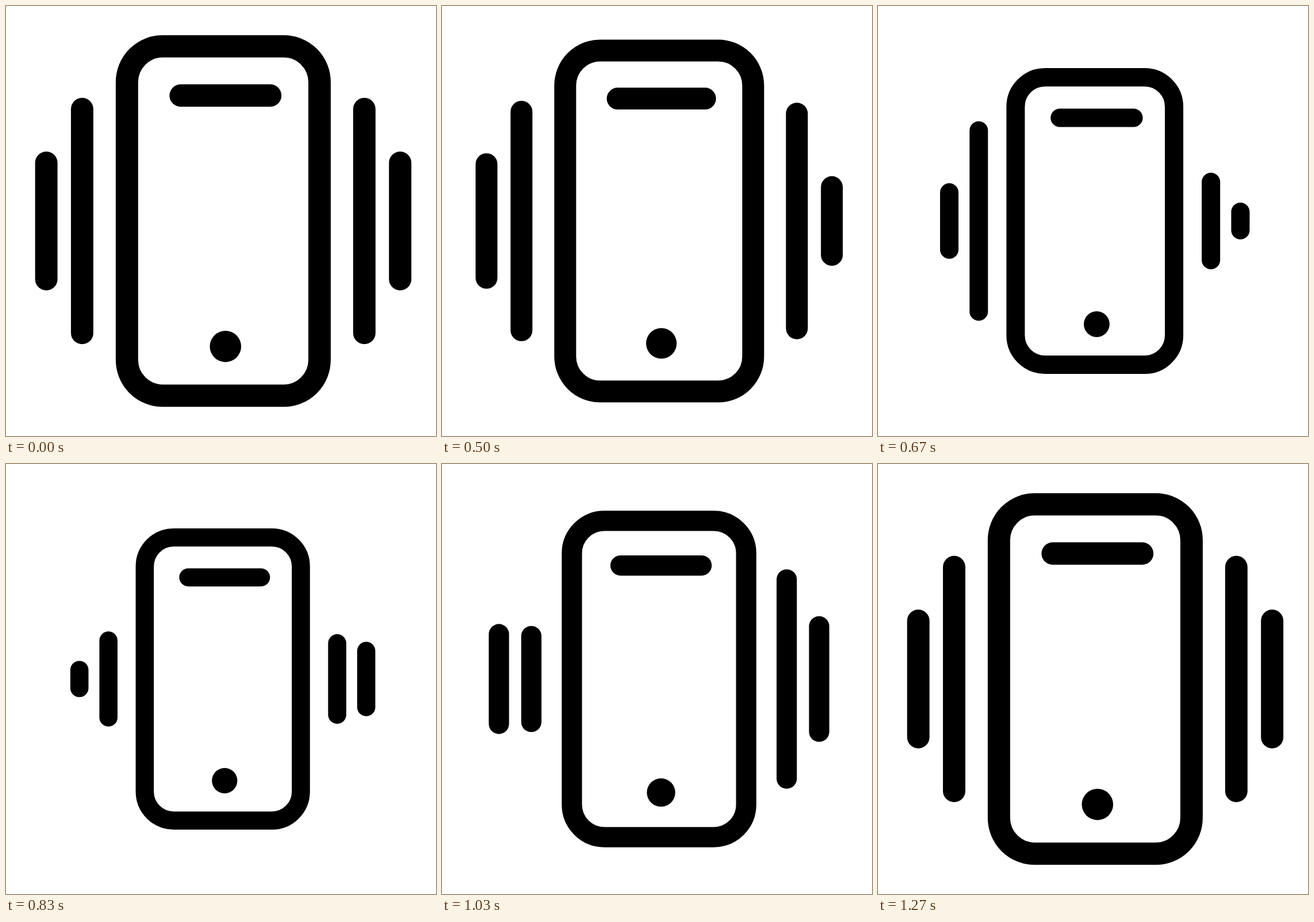
An HTML page that plays this animation: 748x748 px, repeating every 1370 ms.

```html
<!DOCTYPE html>
<html lang="en">
<head>
<meta charset="utf-8">
<title>Vibrating phone</title>
<style>
  html, body { margin: 0; width: 100%; height: 100%; overflow: hidden; background: #fff; }
  svg { display: block; width: 100vw; height: 100vh; }
  .line { fill: none; stroke: #000; stroke-width: 5; stroke-linecap: round; }
</style>
</head>
<body>
<svg viewBox="0 0 96 96">
  <g id="icon">
    <rect class="line" x="27" y="9" width="43" height="78" rx="8"/>
    <path class="line" d="M39 20H59"/>
    <circle cx="49" cy="76" r="3.5"/>
  </g>
</svg>
<script>
const LOOP = 1370;
const MID = 48;
const icon = document.getElementById('icon');

// Each bar shrinks for `span` ticks from `start`, then grows back as long.
const bars = [
  { x: 9,  full: 26, min: 5,    start: 15, span: 10 },
  { x: 17, full: 50, min: 18.8, start: 18, span: 10 },
  { x: 80, full: 50, min: 18.8, start: 13, span: 10 },
  { x: 88, full: 26, min: 5,    start: 10, span: 10 },
];
const zoom = { full: 1, min: 0.81, start: 10, span: 14 };

for (const bar of bars) {
  bar.path = document.createElementNS('http://www.w3.org/2000/svg', 'path');
  bar.path.setAttribute('class', 'line');
  icon.append(bar.path);
}

// cubic-bezier(.8, 0, .2, 1), solved by bisection
function ease(u) {
  if (u <= 0) return 0;
  if (u >= 1) return 1;
  let lo = 0, hi = 1;
  for (let i = 0; i < 30; i++) {
    const v = (lo + hi) / 2, w = 1 - v;
    const x = 2.4 * w * w * v + 0.6 * w * v * v + v * v * v;
    if (x < u) lo = v; else hi = v;
  }
  return lo * lo * (3 - 2 * lo);
}

function valueAt({ full, min, start, span }, tick) {
  const away = Math.abs(tick - start - span) / span;
  return full - (full - min) * ease(1 - away);
}

function draw(ms) {
  // 30 ticks per second, each starting on a whole 10 ms
  const tick = Math.floor((Math.floor((ms % LOOP) / 10) * 10 + 5) * 0.03);
  const s = valueAt(zoom, tick);
  icon.setAttribute('transform', `translate(${MID} ${MID}) scale(${s}) translate(${-MID} ${-MID})`);
  for (const bar of bars) {
    const len = valueAt(bar, tick);
    bar.path.setAttribute('d', `M${bar.x} ${MID - len / 2}v${len}`);
  }
}

const begin = performance.now();
function loop() {
  draw(performance.now() - begin);
  requestAnimationFrame(loop);
}
loop();
</script>
</body>
</html>
```
